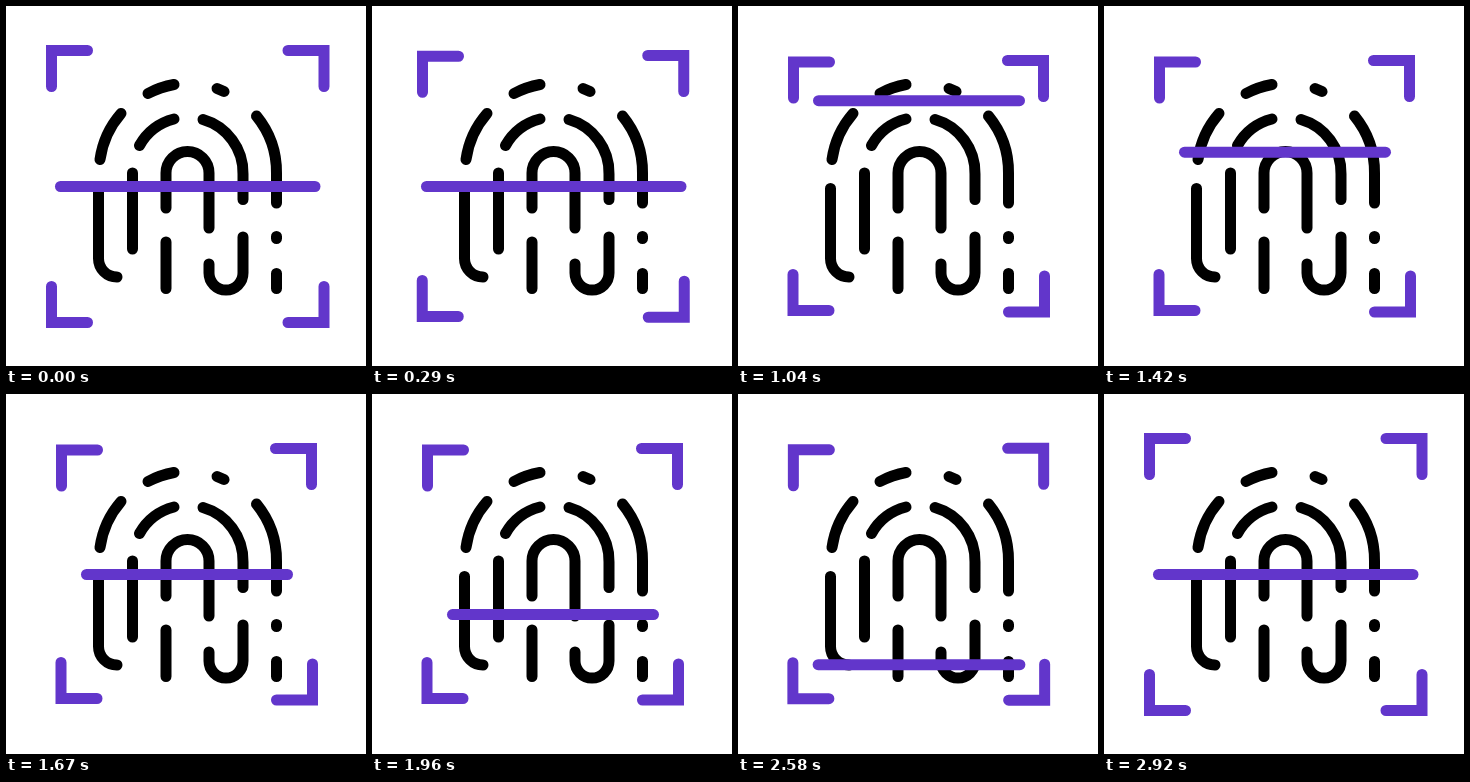
Animation, 360 px wide and 360 px high, one loop 3000 ms. Source, as an HTML page:

```html
<!DOCTYPE html>
<html lang="en">
<head>
<meta charset="utf-8">
<title>Fingerprint scan</title>
<style>
  html, body { margin: 0; height: 100%; overflow: hidden; background: #fff; }
  svg { display: block; width: 100vw; height: 100vh; }
  path { fill: none; stroke-width: 11; stroke-linecap: round; }
  .print { stroke: #000; }
  .scan { stroke: #6236cb; }
</style>
</head>
<body>
<svg viewBox="0 0 360 360">
  <path class="print" d="
    M94 153.500A89 89 0 0 1 115 107.500
    M142 87.500A89 89 0 0 1 168 78.500
    M211 82.500L218 85.500
    M250.500 110A89 89 0 0 1 270.500 167V197
    M133.500 139.500A55.500 55.500 0 0 1 168 113
    M197 113.500A55.500 55.500 0 0 1 237 168V193.500
    M160 202V167A21.500 21.500 0 0 1 203 167V222
    M92.500 182.500V252.500A18.500 18.500 0 0 0 111 271
    M126.500 167V243
    M160 236V282.500
    M203 258V267A17 17 0 0 0 237 267V231
    M270.500 230.500V232.500
    M270.500 267.500V282.500"/>
  <path class="scan" id="corners"/>
  <path class="scan" id="bar"/>
</svg>
<script>
const LOOP = 3000, FPS = 24;
const corners = document.getElementById('corners');
const bar = document.getElementById('bar');

const smooth = u => u * u * (3 - 2 * u);
const easeOut = u => 1 - (1 - u) ** 1.5;
const progress = (f, from, to) => Math.min(1, Math.max(0, (f - from) / (to - from)));
const mix = (a, b, u) => a + (b - a) * u;

// open position, shift when closed, direction of the arms
const CORNERS = [
  [45.5, 44.5, 10, 11.5, 1, 1],
  [318, 44.5, -12.5, 10, -1, 1],
  [45.5, 316.5, 9.5, -12, 1, -1],
  [318, 316.5, -11.5, -10.5, -1, -1]
];
const ARM = 36;

function draw(ms) {
  const f = Math.floor((ms % LOOP + 4) * FPS / 1000);
  const open = smooth(progress(f, 61.4, 70));
  const closed = smooth(progress(f, 1, 13)) - open;
  const rise = easeOut(progress(f, 14, 20));
  const narrow = rise - open;

  corners.setAttribute('d', CORNERS.map(([x0, y0, dx, dy, sx, sy]) => {
    const x = x0 + dx * closed, y = y0 + dy * closed;
    return `M${x + sx * ARM} ${y}H${x}V${y + sy * ARM}`;
  }).join(''));

  let y = mix(180.5, 89, rise);
  y = mix(y, 272, progress(f, 24, 56));
  y = mix(y, 180.5, open);
  bar.setAttribute('d', `M${mix(54.5, 80.5, narrow)} ${y}H${mix(309, 281.5, narrow)}`);
}

function tick() {
  draw(performance.now());
  requestAnimationFrame(tick);
}
tick();
</script>
</body>
</html>
```
